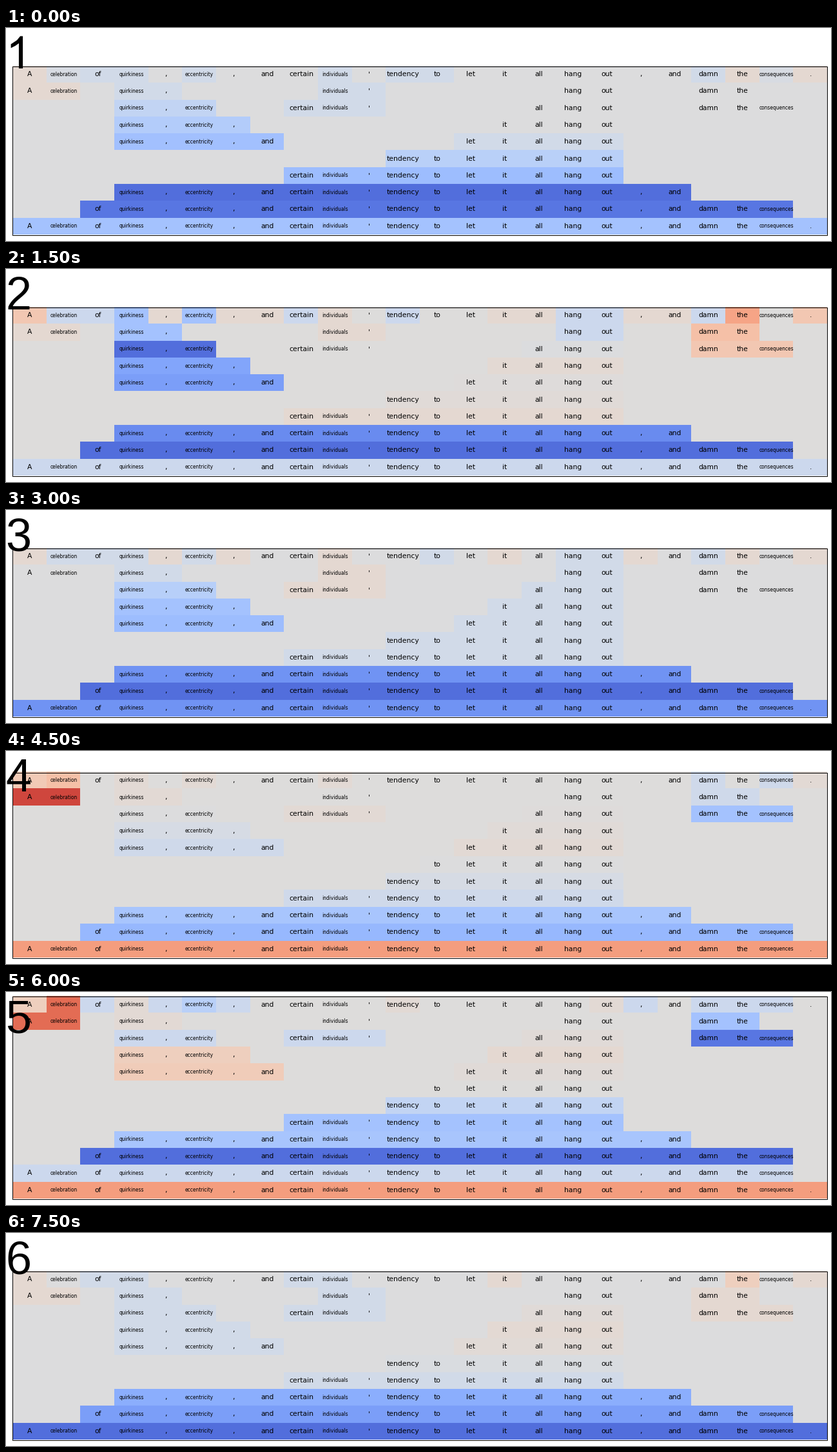
These frames come from a looping animation (1280 by 332 pixels, 8 s). A matplotlib script:

```python
import matplotlib.pyplot as plt
import numpy as np
from matplotlib.animation import FuncAnimation
from matplotlib.patches import Polygon, Rectangle

W, H, DPI = 1280, 332, 80
PT = 72 / DPI  # points per pixel
LEFT, RIGHT, BOTTOM, ROW = 10, 1274, 321.8, 26.275
BASELINE = 63
FRAME_MS, LOOP_MS, STEP_MS = 500, 8000, 1500
NEUTRAL = 50


def sentence(split_to=False, split_stop=False):
    """The sentence as a bracketed tree; the flags add one more level each."""
    tail = "(let (it (all (hang out))))"
    tail = f"(tendency (to {tail}))" if split_to else f"(tendency to {tail})"
    people = f"((certain (individuals ')) {tail})"
    clause = f"(((((quirkiness ,) eccentricity) ,) and) {people} , and)"
    core = f"(A celebration) (of {clause} ((damn the) consequences))"
    return f"(({core}) .)" if split_stop else f"({core} .)"


# Scores run from 0 (blue) to 100 (red). "words" colours single words; every
# other entry gives key scores along a chain of growing phrases.
STEPS = [
    (sentence(), dict(
        words={53: "A the .", 48: "celebration consequences",
               46: "of quirkiness eccentricity individuals tendency to damn"},
        celebration=[53], quirkiness=[46, 31], individuals=[46],
        hang=[50, 50, 30], clause=[8, 10, 32])),
    (sentence(), dict(
        words={61: "A .", 72: "the", 53: ", and individuals it all",
               44: "celebration of certain tendency hang out damn",
               32: "quirkiness eccentricity"},
        celebration=[53], quirkiness=[32, 8, 22, 20], individuals=[53, 50],
        hang=[44, 53, 50, 53], damn=[64, 61], clause=[15, 8, 44])),
    (sentence(), dict(
        words={53: "A , individuals it the .",
               46: "celebration of quirkiness eccentricity to hang out damn"},
        quirkiness=[46, 33, 30], individuals=[53], hang=[46],
        clause=[17, 8, 17])),
    (sentence(split_to=True), dict(
        words={60: "A", 64: "celebration", 45: "damn consequences",
               52: "quirkiness eccentricity individuals ."},
        celebration=[92], quirkiness=[52, 45], individuals=[50, 52],
        hang=[50, 52, 45], damn=[45, 32], clause=[33, 28, 74])),
    (sentence(split_to=True, split_stop=True), dict(
        words={58: "A", 85: "celebration", 38: "eccentricity",
               44: "of , damn the consequences", 52: "quirkiness tendency out"},
        celebration=[85], quirkiness=[52, 44, 58, 59], individuals=[50, 44],
        hang=[50, 53, 50, 32], damn=[32, 10], clause=[33, 8, 44, 74])),
    (sentence(), dict(
        words={53: "A it .", 58: "the", 46: "of quirkiness certain individuals"},
        celebration=[53], quirkiness=[46], individuals=[46],
        hang=[50, 53, 46], damn=[53], clause=[25, 20, 8])),
]

# A plain "1" without a foot, in units of 1/2048 em.
ONE = np.array([(763, 0), (583, 0), (583, 1147), (430, 1035), (223, 930),
                (223, 1104), (500, 1290), (647, 1472), (763, 1472)])

fig = plt.figure(figsize=(W / DPI, H / DPI), dpi=DPI, facecolor="white")
ax = fig.add_axes((0, 0, 1, 1))


def parse(tree):
    """Return the words and the phrases as (height, slice of words)."""
    words, phrases, opened = [], [], []
    for token in tree.replace("(", " ( ").replace(")", " ) ").split():
        if token == "(":
            opened.append([1, len(words)])
        elif token == ")":
            height, first = opened.pop()
            phrases.append((height, slice(first, len(words))))
            if opened:
                opened[-1][0] = max(opened[-1][0], height + 1)
        else:
            words.append(token)
    return words, phrases


def chain_of(phrase):
    if "quirkiness" in phrase and "hang" in phrase:
        return "clause"
    heads = ("hang", "quirkiness", "celebration", "individuals", "damn")
    return next(head for head in heads if head in phrase)


def build_table(tree, moods):
    """Return the words, and the scores and visibility of each cell."""
    words, phrases = parse(tree)
    shape = max(height for height, _ in phrases) + 1, len(words)
    scores, shown = np.full(shape, float(NEUTRAL)), np.zeros(shape, bool)

    shown[0] = True
    for score, group in moods["words"].items():
        scores[0, np.isin(words, group.split())] = score

    chains = {}
    for height, span in phrases:
        chains.setdefault(chain_of(words[span]), []).append((height, span))
    for name, members in chains.items():
        keys = moods.get(name, [NEUTRAL])
        values = np.interp(np.linspace(0, 1, len(members)),
                           np.linspace(0, 1, len(keys)), keys)
        for (height, span), value in zip(members, values):
            scores[height, span] = value
            shown[height, span] = True
    return words, scores, shown


def draw_number(number):
    if number == 1:
        points = ONE * (70 / 2048) * (1, -1) + (0, BASELINE)
        ax.add_patch(Polygon(points, fc="black", lw=0, zorder=5))
    else:
        ax.text(-1, BASELINE, str(number), family="Liberation Sans",
                size=72 * PT, va="baseline", zorder=5)


def draw(frame):
    step = min(frame * FRAME_MS // STEP_MS, len(STEPS) - 1)
    words, scores, shown = build_table(*STEPS[step])
    top = BOTTOM - ROW * len(scores)
    col = (RIGHT - LEFT) / len(words)

    ax.clear()
    ax.axis("off")
    ax.imshow(scores / 100, cmap="coolwarm", vmin=0, vmax=1, aspect="auto",
              interpolation="nearest", extent=(LEFT, RIGHT, BOTTOM, top))
    ax.set(xlim=(0, W), ylim=(H, 0))
    for r, c in np.argwhere(shown):
        size = 7.55 if len(words[c]) > 8 else 10.7
        ax.text(LEFT + (c + 0.5) * col + 0.4, top + (r + 0.5) * ROW, words[c],
                family="DejaVu Sans", size=size * PT, ha="center", va="center")
    # The offset makes the border snap to the pixel row below the edge.
    ax.add_patch(Rectangle((LEFT, top + 0.75), RIGHT - LEFT, BOTTOM - top,
                           fill=False, ec="black", lw=PT, zorder=4))
    draw_number(step + 1)
    return []


anim = FuncAnimation(fig, draw, frames=LOOP_MS // FRAME_MS,
                     interval=FRAME_MS, repeat=True, repeat_delay=0)
plt.show()
```
